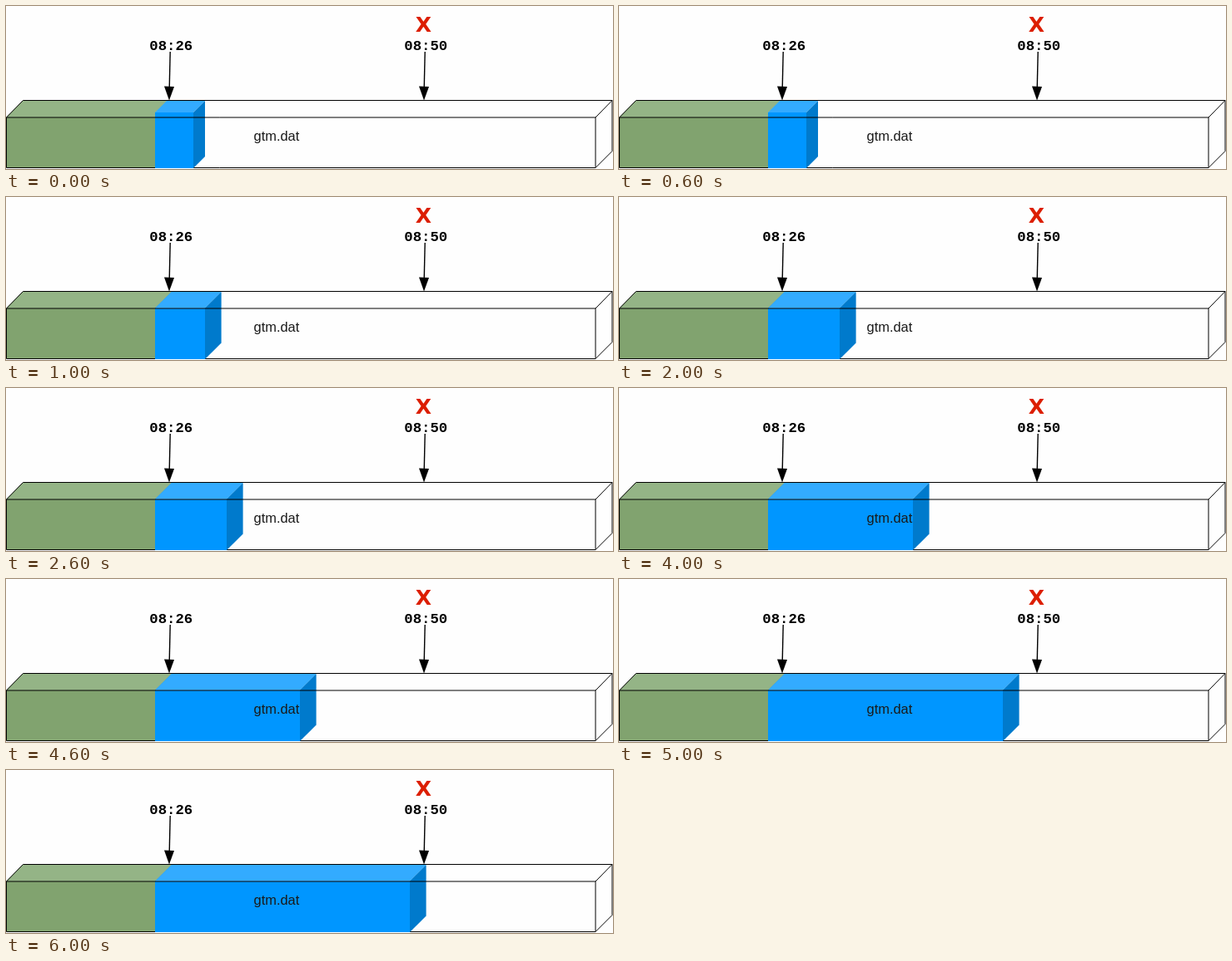
An HTML page that plays this animation: 729x196 px, repeating every 7000 ms.

```html
<!DOCTYPE html>
<html lang="en">
<meta charset="utf-8">
<title>gtm.dat</title>
<style>
  html, body { margin: 0; width: 100%; height: 100%; overflow: hidden; background: #fefefe; }
  svg { display: block; }
  .time { font: bold 17.3px "Liberation Mono", monospace; }
  .name { font: 16.4px "Liberation Sans", sans-serif; fill: #1a1a1a; }
  .mark { font: bold 25px "DejaVu Sans", sans-serif; fill: #dc1e00; text-anchor: middle; }
  .edge { fill: none; stroke: #000; stroke-width: 1; }
</style>
<svg width="729" height="196" viewBox="0 0 729 196">
  <defs>
    <g id="arrow">
      <path d="M1.2 55L.2 99" stroke="#000" stroke-width="1.4"/>
      <path d="M-6 96.5L6 97L0 113.5Z"/>
    </g>
  </defs>
  <path class="edge" d="M.5 194.5H708"/>
  <path fill="#81a36f" d="M0 134H179V194H0Z"/>
  <path fill="#94b486" d="M0 134L20 114H199L179 134Z"/>
  <path fill="none" stroke="#7c9852" d="M179 134L199 114"/>
  <path id="front" fill="#0096ff"/>
  <path id="top" fill="#33abff"/>
  <path id="side" fill="#007acc"/>
  <path class="edge" d="M.5 194.5V134L20.5 113.5H728V174.5L708 194.5V134L728 113.5M.5 134H708"/>
  <use href="#arrow" x="196"/>
  <use href="#arrow" x="502"/>
  <text class="time" x="172.3" y="53">08:26</text>
  <text class="time" x="478.3" y="53">08:50</text>
  <text class="mark" x="501.5" y="31">X</text>
  <text class="name" x="297.6" y="162">gtm.dat</text>
</svg>
<script>
  const LEFT = 179, BACK = 114, BOTTOM = 195;
  const rightEdges = [225, 239, 265, 301, 353, 461, 485];
  const setPath = (id, d) => document.getElementById(id).setAttribute("d", d);

  function drawBlock(step) {
    const right = rightEdges[step];
    const depth = step ? 19.6 : 14;
    const y = BACK + depth;
    setPath("front", `M${LEFT} ${y}H${right}V${BOTTOM}H${LEFT}Z`);
    setPath("top", `M${LEFT} ${y}l${depth} ${-depth}H${right + depth}L${right} ${y}Z`);
    setPath("side", `M${right} ${y}l${depth} ${-depth}V${BOTTOM - depth}L${right} ${BOTTOM}Z`);
  }

  function tick() {
    drawBlock(Math.floor(performance.now() / 1000) % rightEdges.length);
    requestAnimationFrame(tick);
  }
  tick();
</script>
</html>
```
